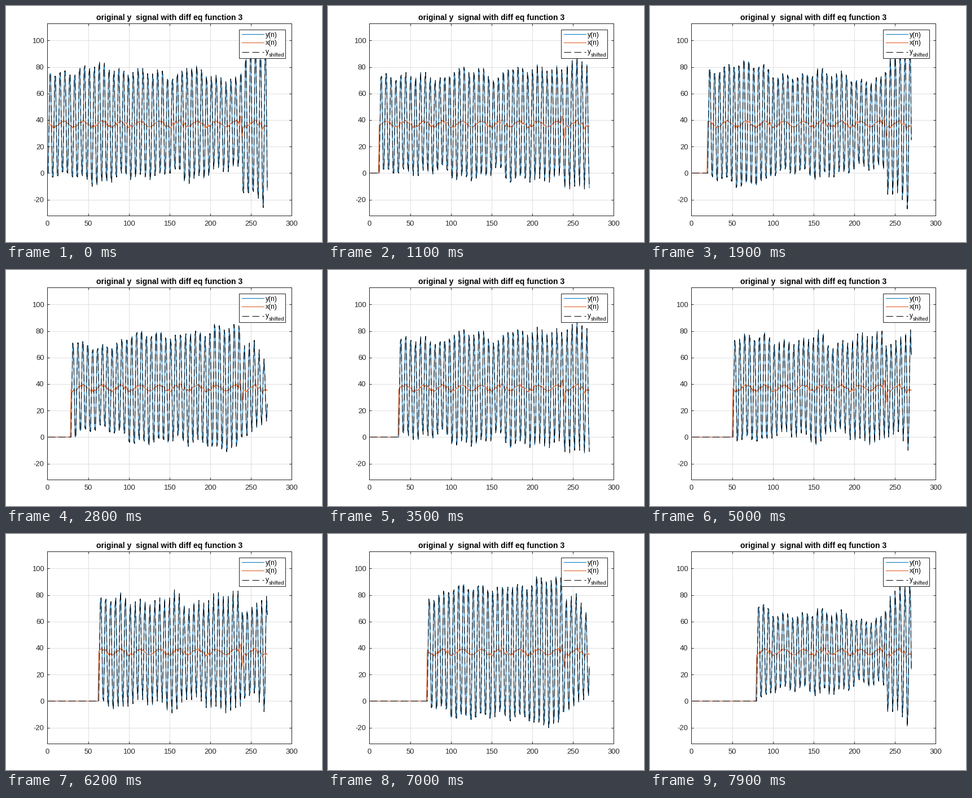
Write a matplotlib script that moves like this. It is 560x420 px and loops after 8000 ms.

```python
import numpy as np
import matplotlib.pyplot as plt
from matplotlib.animation import FuncAnimation
from matplotlib.lines import Line2D
from matplotlib.patches import Rectangle

W, H, DPI = 560, 420, 100
PX = 72 / DPI  # one pixel in points
N, FRAMES = 270, 80
BLUE, ORANGE, BLACK, INK = "#0072BD", "#D95319", "#000000", "#262626"
DASH = (0, (9, 4))

plt.rcParams.update({"font.family": "Liberation Sans",
                     "axes.unicode_minus": False,
                     "lines.scale_dashes": False})

# Key points of the period-6 swing: sample, value at phase 0, value at phase 1
SWING = [(0, -38.5, 0), (30, -38, -1), (62, -46, -6), (92, -39, -4),
         (104, -35, 5.5), (142, -35, 4), (157, -35, -4), (170, -37.5, 6.5),
         (190, -36, 4.5), (205, -28, 7), (236, -28, 5), (240, -50, -2),
         (254, -53, -2), (267, -62, -13)]


def make_input():
    """Integer input x(1..N): a slow wave plus what drives the swing."""
    p = np.arange(N + 2)
    at, *rows = zip(*SWING)
    a, b = (np.interp(p, at, row) for row in rows)
    t = (p - 1) * np.pi / 3
    swing = a * np.cos(t) + (2 * b - a) / np.sqrt(3) * np.sin(t)
    level = 37 - 2.3 * np.cos(2 * np.pi * (p - 32) / 23.4)
    y = np.round(level + swing)
    return y[2:] - y[1:-1] + y[:-2]


def respond(x):
    """y(n) = x(n-1) + y(n-1) - y(n-2), starting at rest."""
    y = np.zeros(len(x))
    for n in range(1, len(x)):
        y[n] = x[n - 1] + y[n - 1] - (y[n - 2] if n > 1 else 0)
    return y


fig = plt.figure(figsize=(W / DPI, H / DPI), dpi=DPI, facecolor="white")
L, R, T, B = 73.4, 506.4, 31.4, 373.4
ax = fig.add_axes([L / W, 1 - B / H, (R - L) / W, (B - T) / H])
ax.set(xlim=(0, 300), ylim=(-32.2, 112.7),
       xticks=range(0, 301, 50), yticks=range(-20, 101, 20))
ax.set_axisbelow(True)
ax.grid(color="#dfdfdf", lw=PX)
ax.tick_params(direction="in", length=4.3 * PX, width=PX, color=INK,
               labelcolor=INK, labelsize=13 * PX, top=True, right=True,
               pad=6 * PX)
ax.tick_params(axis="x", pad=9 * PX)
for side in ax.spines.values():
    side.set(color=INK, linewidth=PX, zorder=5)


def put(x, y, s, size, **kw):
    fig.text(x / W, 1 - y / H, s, fontsize=size * PX, va="baseline", **kw)


def key(y, color, style="-"):
    fig.add_artist(Line2D([418 / W, 457 / W], [1 - y / H] * 2, color=color,
                          lw=PX, ls=style, zorder=11))


put(290, 25, "original y  signal with diff eq function 3", 14,
    weight="bold", ha="center", color=BLACK)

# Legend
fig.add_artist(Rectangle((413.4 / W, 1 - 93.4 / H), 82 / W, 51 / H,
                         fc="white", ec=INK, lw=PX, zorder=10))
key(50.4, BLUE)
key(65.4, ORANGE)
key(82.4, BLACK, DASH)
put(460, 55, "y(n)", 12, zorder=11)
put(460, 69, "x(n)", 12, zorder=11)
put(460, 85, "y", 12, zorder=11)
put(466, 90.5, "shifted", 9.3, zorder=11)

n = np.arange(1, N + 1)
signal = make_input()
y_line, = ax.plot([], [], color=BLUE, lw=PX, zorder=2)
x_line, = ax.plot([], [], color=ORANGE, lw=PX, zorder=3)
s_line, = ax.plot([], [], color=BLACK, lw=PX, ls=DASH, zorder=4,
                  dash_capstyle="butt")


def update(i):
    x = np.where(n > i, signal, 0)
    y = respond(x)
    y_line.set_data(n, y)
    x_line.set_data(n, x)
    s_line.set_data(n, y)
    return y_line, x_line, s_line


anim = FuncAnimation(fig, update, frames=FRAMES, interval=100,
                     repeat=True, repeat_delay=0, blit=False)
plt.show()
```
